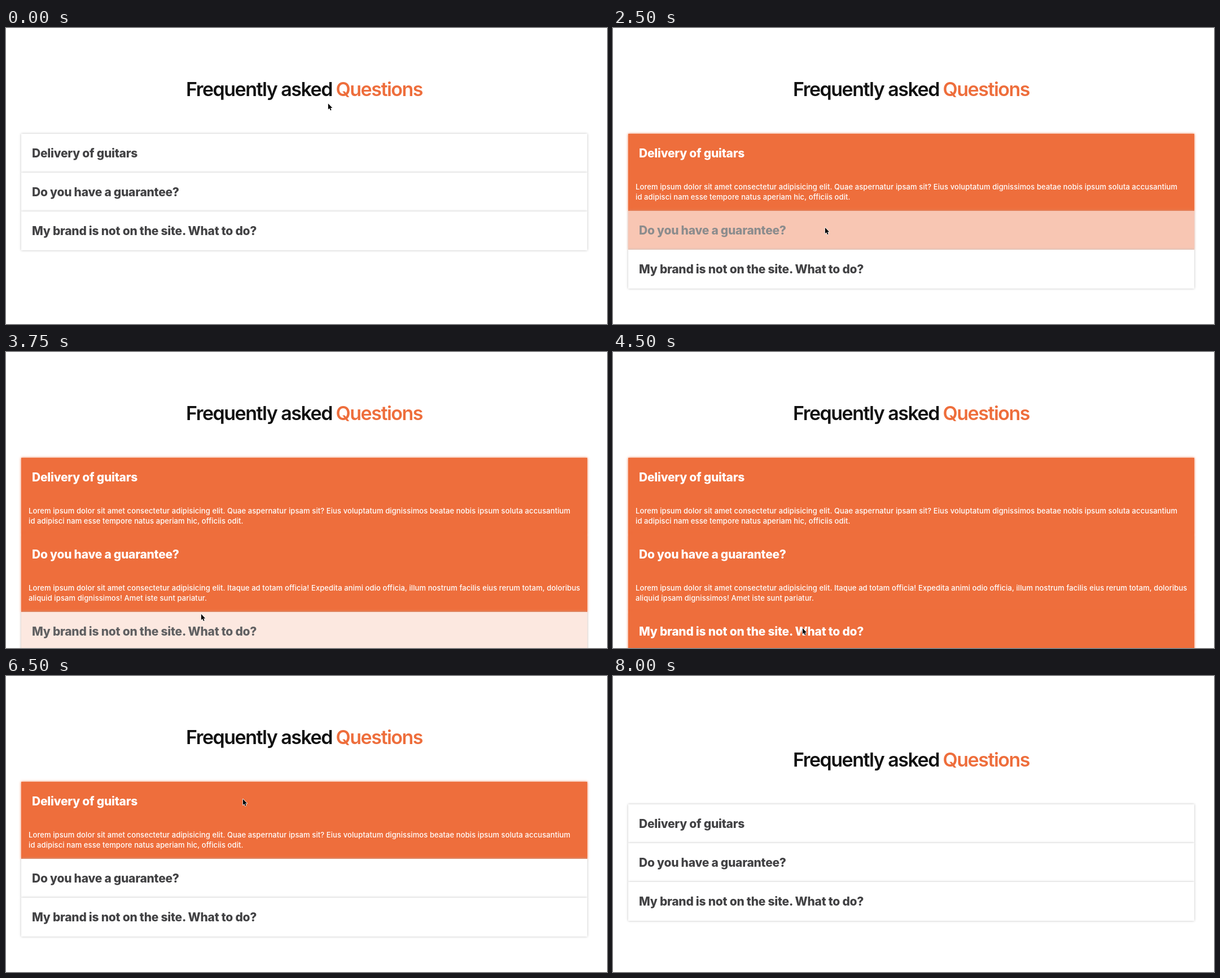
Recreate the animation shown at these times as an HTML page. Size 1065x526 px, loop 8750 ms.

```html
<!DOCTYPE html>
<html lang="en">
<head>
<meta charset="utf-8">
<title>Frequently asked questions</title>
<style>
  html, body { margin: 0; width: 100%; height: 100%; overflow: hidden; background: #fff; }
  body { position: relative; font-family: Inter, "Open Sans", sans-serif; }
  #page { position: absolute; left: 0; top: 0; width: 1065px; height: 526px; }
  h1 { margin: 0; font-size: 34px; line-height: 40px; font-weight: 600; letter-spacing: -1.5px; color: #111; }
  h1 span { position: absolute; top: 88.5px; left: 319px; white-space: nowrap; }
  h1 .accent { left: 584.5px; color: #ee6e3c; }
  #list { position: absolute; left: 27px; top: 188px; width: 1003px; }
  .item { position: relative; overflow: hidden; }
  h2 { margin: 0 0 0 19px; height: 69px; font-size: 21px; line-height: 70px; font-weight: 800; letter-spacing: -.25px; white-space: nowrap; }
  p { margin: 0; padding: 15.7px 0 0 13px; font-size: 13px; line-height: 18.6px; font-weight: 500; letter-spacing: .1px; color: #fff; white-space: nowrap; }
  #cursor { position: absolute; left: -1.4px; top: -1.2px; overflow: visible; }
</style>
</head>
<body>
<div id="page">
  <h1><span>Frequently asked</span> <span class="accent">Questions</span></h1>
  <div id="list">
    <div class="item">
      <h2>Delivery of guitars</h2>
      <p>Lorem ipsum dolor sit amet consectetur adipisicing elit. Quae aspernatur ipsam sit? Eius voluptatum dignissimos beatae nobis ipsum soluta accusantium<br>id adipisci nam esse tempore natus aperiam hic, officiis odit.</p>
    </div>
    <div class="item">
      <h2>Do you have a guarantee?</h2>
      <p>Lorem ipsum dolor sit amet consectetur adipisicing elit. Itaque ad totam officia! Expedita animi odio officia, illum nostrum facilis eius rerum totam, doloribus<br>aliquid ipsam dignissimos! Amet iste sunt pariatur.</p>
    </div>
    <div class="item">
      <h2>My brand is not on the site. What to do?</h2>
    </div>
  </div>
</div>
<svg id="cursor" width="13" height="16.7" viewBox="-2 -2 14 18">
  <path d="M0 0V11.2L2.6 8.9 4.3 13 6.2 12.2 4.5 8.2H8Z" fill="#000" stroke="#fff" stroke-width="1.6" stroke-linejoin="round" paint-order="stroke"/>
</svg>
<script>
const LOOP = 8750, STEP = 250, FADE = 300, GLIDE = 750;
const HEAD = 69, BODY = 68, SCROLL = 40, EXIT = 8000;
const WHITE = [255, 255, 255], ORANGE = [238, 110, 60], INK = [66, 66, 68], EDGE = [188, 188, 188];

const items = [...document.querySelectorAll('.item')];
const page = document.getElementById('page');
const cursor = document.getElementById('cursor');

// Pointer enters a row, opens it, closes it again and leaves
const visits = [
  { enter: 1510, open: 2000, close: 7200, leave: 7500 },
  { enter: 2383, open: 3000, close: 5600, leave: 5900 },
  { enter: 3702, open: 4000, close: 5000, leave: 5100 }
];

const home = { x: 570, y: 133.5 };
const stops = [
  { at: 1250, x: 480, y: 190 },
  { at: 1750, x: 388, y: 226 },
  { at: 2500, x: 375, y: 354 },
  { at: 3750, x: 345, y: 465 },
  { at: 4500, x: 335, y: 490 },
  { at: 5500, x: 376, y: 352 },
  { at: 6500, x: 419, y: 218 },
  { at: EXIT, x: 470, y: 140 }
];

const ramp = (t, from, span) => Math.min(1, Math.max(0, (t - from) / span));
const ease = u => u * u * (3 - 2 * u);
const lerp = (a, b, u) => a + (b - a) * u;
const mix = (a, b, u) => `rgb(${a.map((v, i) => Math.round(lerp(v, b[i], u)))})`;

function pointer(t) {
  return stops.reduce((p, s) => {
    const u = ease(ramp(t, s.at - GLIDE, GLIDE));
    return { x: lerp(p.x, s.x, u), y: lerp(p.y, s.y, u) };
  }, home);
}

function drawItem(el, visit, t) {
  const fill = ramp(t, visit.enter, FADE) - ramp(t, visit.leave, FADE);
  const open = ease(ramp(t, visit.open, FADE)) - ease(ramp(t, visit.close, FADE));
  el.style.height = HEAD + BODY * open + 'px';
  el.style.background = mix(WHITE, ORANGE, fill);
  el.style.color = mix(INK, WHITE, fill);
  el.style.boxShadow = `0 0 4px ${mix(EDGE, ORANGE, fill)}`;
}

function draw(t) {
  items.forEach((el, i) => drawItem(el, visits[i], t));
  page.style.transform = `translateY(${SCROLL * ramp(t, EXIT - STEP, STEP)}px)`;
  const { x, y } = pointer(t);
  cursor.style.transform = `translate(${x}px, ${y}px)`;
  cursor.style.visibility = t < EXIT ? 'visible' : 'hidden';
}

const start = performance.now();
function tick() {
  const t = (performance.now() - start) % LOOP;
  draw(Math.floor(t / STEP) * STEP);
  requestAnimationFrame(tick);
}
tick();
</script>
</body>
</html>
```
